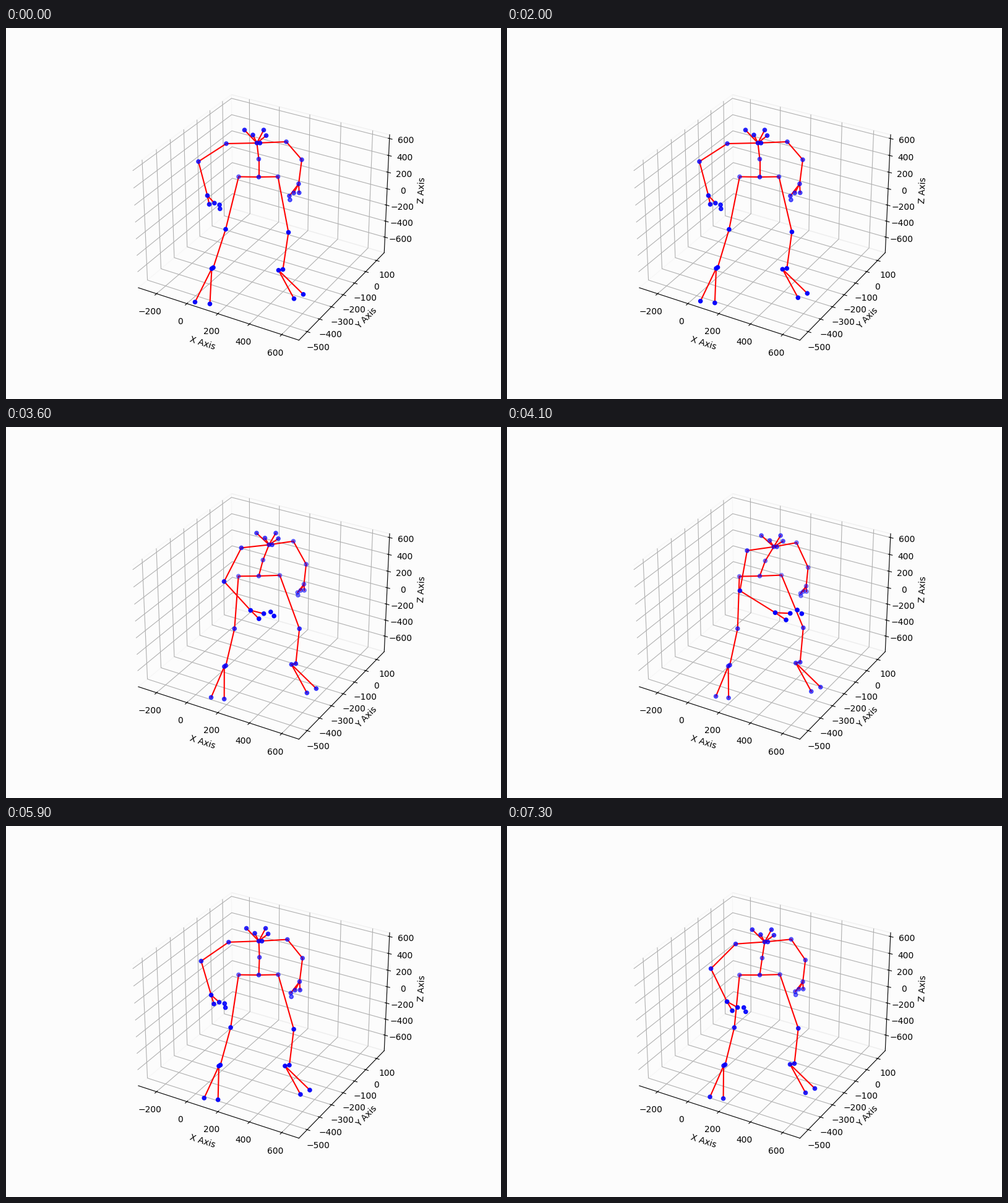
Write a matplotlib script that moves like this. It is 800 px wide and 600 px high and loops after 7.4 s.

```python
import matplotlib.pyplot as plt
import numpy as np
from matplotlib.animation import FuncAnimation
from matplotlib.collections import LineCollection

W, H, DPI = 800, 600, 100
FRAMES, STEP = 74, 100
PAPER = "#fcfcfc"

# ---- static 3D box ----
fig = plt.figure(figsize=(W / DPI, H / DPI), dpi=DPI, facecolor=PAPER)
box = fig.add_subplot(projection="3d")
box.set_facecolor(PAPER)
box.set(xlim=(-322, 705), ylim=(-566, 172), zlim=(-797, 645),
        xlabel="X Axis", ylabel="Y Axis", zlabel="Z Axis")
for axis in (box.xaxis, box.yaxis, box.zaxis):
    axis.pane.fill = False

# Figure layer in stage pixels, measured from the top left
stage = fig.add_axes([0, 0, 1, 1], zorder=5)
stage.set(xlim=(0, W), ylim=(H, 0))
stage.axis("off")

# ---- skeleton: each joint is an offset x + yj from its parent ----
PELVIS = 408.5 + 241j
SWING, ARM, STRIDE = range(3)
joints, shades, bones = [], [], []


def joint(parent, start, end=None, drive=SWING, shade=(.7, .5), bone=True):
    """Hang a joint on its parent; its drive turns start into end."""
    index = len(joints)
    joints.append((parent, start, start if end is None else end, drive))
    shades.append(shade)
    if bone and parent is not None:
        bones.append((parent, index))
    return index


def hand(wrist, shape, bend, linked, shade):
    """Four finger markers, the first few of them joined to the wrist."""
    for i, offset in enumerate(shape):
        joint(wrist, offset, offset * bend, shade=shade, bone=i < linked)


def leg(hip, thigh, shin, heel, toes):
    near = dict(drive=STRIDE, shade=(.95, .6))
    knee = joint(hip, *thigh, **near)
    ankle = joint(knee, *shin, **near)
    back = joint(ankle, heel, **near)
    for toe in toes:
        joint(back, *toe, **near)


# trunk and head
pelvis = joint(None, 0)
spine = joint(pelvis, -29j, 9.5 - 24j, shade=(.6, .45))
neck = joint(spine, -3 - 26j, 15 - 22j, shade=(.8, .55))
joint(neck, 5, shade=(.85, .6))
for marker in (-20 - 21j, 11 - 21j, -6.5 - 13j, 15 - 12j):
    joint(neck, marker, marker + 3j, shade=(.8, .57))

FINGERS = np.array([3 + 14.2j, 11.4 + 12.2j, 19.6 + 15j, 20.3 + 21.4j])
MIRRORED = -np.conj(FINGERS * np.exp(1j * np.radians(15)))

# right arm
far = (.65, .42)
shoulder = joint(neck, 47.5 - 2j, 36 - 7j, shade=far)
elbow = joint(shoulder, 25 + 29j, 18 + 41j, shade=far)
wrist = joint(elbow, -5 + 39j, -3 + 29.5j, shade=far)
hand(wrist, MIRRORED, .58, 3, far)

# legs
hip = joint(pelvis, 31 - .5j, 35.5 - 1.5j, shade=(.55, .35))
leg(hip, (17 + 90j, 38 + 84j), (-9 + 60j, -4.5 + 55j), -7 + 1.3j,
    [(25 + 46j,), (40 + 39j,)])
hip = joint(pelvis, -32.5 - .5j, -33 + .7j, shade=(.5, .4))
leg(hip, (-21 + 85j, 84j), (-20 + 62j, -11.5 + 58.5j), -2.5 + 1.7j,
    [(-27 + 54j, -19 + 48j), (-3 + 57j, 1 + 50.5j)])

# left arm, nearest to the viewer when it swings across
near = (.87, 1)
shoulder = joint(neck, -49.5 + 1j, -42.5 + 6.5j, shade=(.7, .65))
elbow = joint(shoulder, -45 + 29j, -5 + 67.5j, ARM, (.75, .85))
wrist = joint(elbow, 14.5 + 55j, 61.5 + 30.5j, ARM, near)
hand(wrist, FINGERS, 1.5 * np.exp(-1j * np.radians(48)), 2, near)

shades = np.array(shades)


# ---- motion ----
def drives(t):
    """Trunk swing, arm swing and stride; 0 is open, 1 is turned in."""
    # one slow turn first, then a steady rhythm
    cycle = t / 20 if t < 20 else 1 + (t - 20) / 12.8
    wave = (1 - np.cos(2 * np.pi * cycle)) / 2
    depth = 1.04 + .12 * np.exp(-((t - 51) / 5) ** 2)
    swing = depth * wave ** .6
    drift = np.sqrt(t / (FRAMES - 1))
    return swing, swing ** 1.5, .65 * swing + .35 * drift


def place(amounts):
    spots = []
    for parent, start, end, drive in joints:
        if parent is None:
            spots.append(PELVIS)
        else:
            # a complex power turns and stretches the bone evenly
            spots.append(spots[parent]
                         + start * (end / start + 0j) ** amounts[drive])
    spots = np.array(spots)
    return np.column_stack([spots.real, spots.imag])


limbs = LineCollection([], colors="red", linewidths=1.5,
                       capstyle="projecting", zorder=2)
stage.add_collection(limbs, autolim=False)
dots = stage.scatter(*place(drives(0)).T, s=20, color="blue", zorder=3)


def draw(frame):
    amounts = drives(frame)
    points = place(amounts)
    turn = min(amounts[SWING], 1)
    colors = np.zeros((len(points), 4))
    colors[:, 2] = 1
    colors[:, 3] = shades @ [1 - turn, turn]
    limbs.set_segments([points[[a, b]] for a, b in bones])
    dots.set_offsets(points)
    dots.set_facecolors(colors)
    dots.set_edgecolors(colors)
    return limbs, dots


anim = FuncAnimation(fig, draw, frames=FRAMES, interval=STEP,
                     init_func=lambda: draw(0), repeat=True, repeat_delay=0)
plt.show()
```
